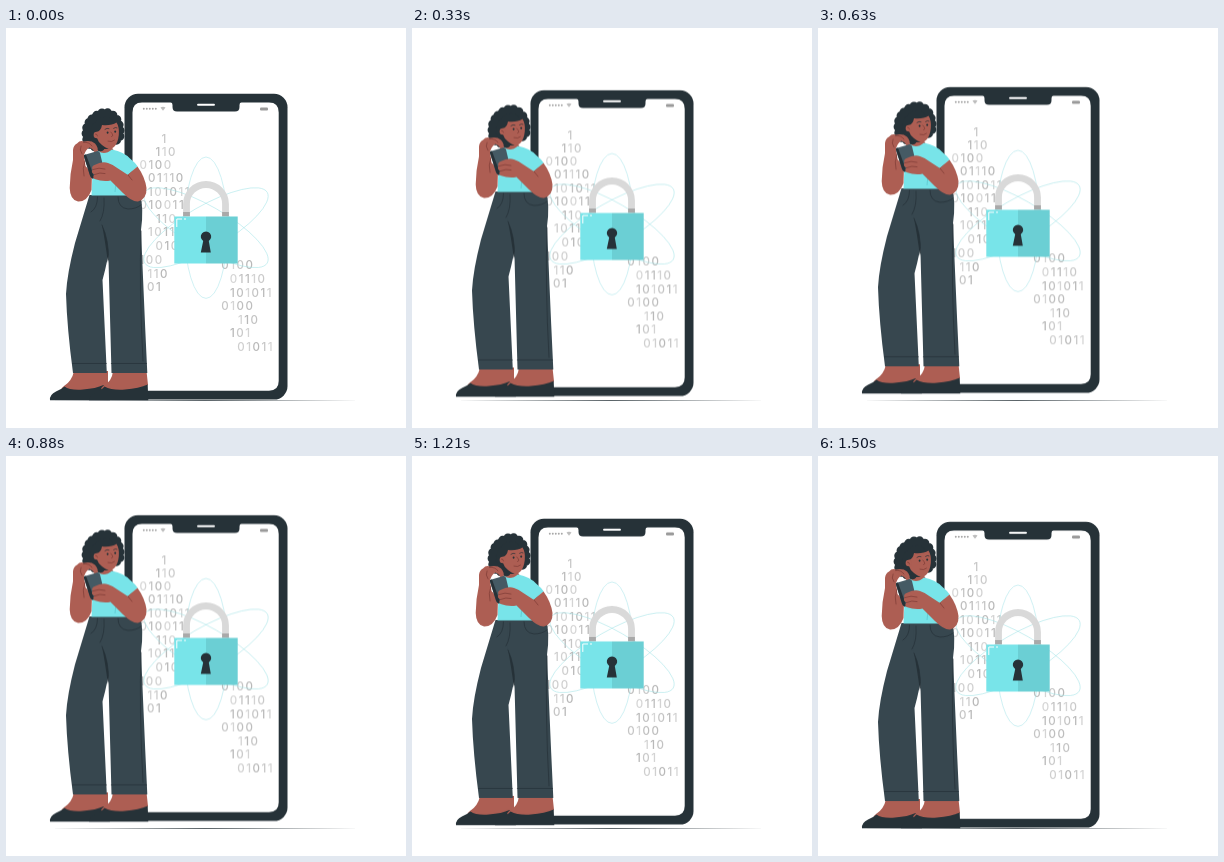
An HTML page that plays this animation: 400 by 400 pixels, repeating every 1.54 s.

```html
<!DOCTYPE html>
<html lang="en">
<head>
<meta charset="utf-8">
<title>Phone security</title>
<style>
  html, body { margin: 0; width: 100%; height: 100%; overflow: hidden; background: #fff; }
  svg { display: block; width: 100vw; height: 100vh; }
  .float { animation: float 1540ms linear infinite; }
  /* up for 750 ms, down for 750 ms, then a short rest */
  @keyframes float {
    0%, 97.403%, 100% { transform: translateY(0); }
    48.701% { transform: translateY(-8px); }
  }
  .dark { fill: #263238; }
  .skin { fill: #ad5e53; }
  .cyan { fill: #78e4e9; }
  .pants { fill: #37474f; }
  .line { fill: none; stroke: #263238; stroke-width: .7; stroke-linecap: round; stroke-linejoin: round; }
  .fold { fill: none; stroke: #7d3b36; stroke-width: .7; stroke-linecap: round; }
  .digits { font: 500 11.5px Inter, sans-serif; letter-spacing: 1.5px; fill: #b4b4b4; }
  .atom { fill: none; stroke: #a3e4e9; stroke-width: .6; stroke-opacity: .85; }
</style>
</head>
<body>
<svg viewBox="0 0 400 400">
  <path class="dark" d="M44 372.5Q199 371.9 354 372.5Q199 373.4 44 372.5Z"/>

  <g class="float">
    <g id="phone">
      <rect class="dark" x="118.5" y="65.8" width="163" height="305.8" rx="13.5"/>
      <path fill="#fff" d="M136 74.6H164.5Q166.500 74.6 166.500 77V79Q166.500 83.5 171 83.5H229Q233.500 83.5 233.500 79V77Q233.500 74.6 235.500 74.6H263Q272.700 74.6 272.700 84.5V353Q272.700 362.700 263 362.700H136Q126.500 362.700 126.500 353V84.500Q126.500 74.600 136 74.600Z"/>
      <path d="M192 76.700H208" stroke="#fff" stroke-width="1.900" stroke-linecap="round"/>
      <path d="M137.800 80.800H151" stroke="#a6a6a6" stroke-width="1.900" stroke-linecap="round" stroke-dasharray="0 3"/>
      <path d="M154.500 79.600Q157 77.800 159.500 79.600L157 82.800Z" fill="#bdbdbd"/>
      <rect x="254" y="79.400" width="8" height="3.200" rx="1" fill="#9a9a9a"/>
    </g>

    <g id="digits" class="digits"></g>

    <g class="atom">
      <ellipse cx="200" cy="199.700" rx="21.500" ry="70.700"/>
      <ellipse cx="200" cy="199.700" rx="21.500" ry="70.700" transform="rotate(60 200 199.700)"/>
      <ellipse cx="200" cy="199.700" rx="21.500" ry="70.700" transform="rotate(-60 200 199.700)"/>
    </g>

    <g id="lock">
      <path d="M180.500 188V176A19.500 19.500 0 0 1 219.500 176V188" fill="none" stroke="#d9d9d9" stroke-width="6.800"/>
      <path d="M177.100 184H183.900V188.500H177.100ZM216.100 184H222.900V188.500H216.100Z" fill="#a9a9a9"/>
      <path class="cyan" d="M168.300 188.400H200V235.400H168.300Z"/>
      <path fill="#6bcfd4" d="M200 188.400H231.700V235.400H200Z"/>
      <path d="M170.800 199V191H176M178 191H180" fill="none" stroke="#fff" stroke-width="1"/>
      <path class="dark" d="M197.200 213A5.200 5.200 0 1 1 202.800 213L204.800 224.500H194.800Z"/>
    </g>

    <g id="woman">
      <!-- feet -->
      <path class="skin" d="M68 343H102V357Q88 364 58 363.500Q53 361.500 58 358Q66 353 68 343Z"/>
      <path class="dark" d="M44 372.200Q43.500 366.500 50 363.500Q55 361.500 58.500 358.500Q64 362.500 77 361.500Q90 360.500 97.500 357L104 372.200Z"/>
      <path class="skin" d="M107 343H140.500L142 357Q128 364 97 362.500Q93 360.500 98 357.500Q106 353 107 343Z"/>
      <path class="dark" d="M83 372.200Q83 367.500 88 365.500Q95 362.500 98.500 358.500Q106 362.500 119 361.500Q133 360.500 141.700 356.500L142.300 372.200Z"/>

      <!-- trousers -->
      <path class="pants" d="M83.500 167H118L106 206Q102 232 96.500 252L100.800 345H67Q61 300 60 266Q61 246 69 215Z"/>
      <path class="dark" d="M96 197L106 200L102 235Q99 212 96 197Z"/>
      <path class="pants" d="M95 167H134Q138 180 135 202Q137 250 139.200 300L141.300 345H105.500L102.500 232Q103 212 96 197Z"/>
      <path class="line" d="M66.500 335.500H100.300M105.300 335.500H140.500M98 170Q99 185 94 193M91.500 169Q91.500 180 85 184M112 169Q112 180 122 181Q130 181 135 177M96 197Q103 212 102.500 232M135 203Q133 260 137 333"/>

      <!-- torso -->
      <path class="skin" d="M93 112L91 126L101 133L108 123L104 116Z"/>
      <path class="cyan" d="M92 122.500Q98 128 106 121.500Q118 124 124 130.500Q129 134.500 131.700 138.500L122 147V167.500H85.500L86.500 146Z"/>
      <path d="M108 150Q111 156 109 164" fill="none" stroke="#58c4cc" stroke-width=".7"/>

      <!-- hair and face -->
      <path class="dark" stroke="#263238" stroke-width="9" stroke-linecap="round" stroke-dasharray="0 5.800" d="M86 91Q98 80 108 88Q116 96 113.500 111L94 119Q82 120 80.500 110Q78.500 98 86 91Z"/>
      <path class="skin" d="M90.500 104Q95 103 96 97Q105 98 110.500 94.500Q113.500 99 112.800 107Q112 115 108 119Q103 123 96 117Q92 114 91 110Z"/>
      <circle class="skin" cx="90.800" cy="107" r="3.200"/>
      <path class="fold" d="M104.800 104Q108.500 108 105.600 108.600M102 113.200Q106 114.500 108.500 112.200M89.500 106Q91 105.500 91.500 108"/>
      <path class="line" d="M99 101.300Q101 99.600 103 100.600M107.600 100.300Q109.500 98.900 111 99.800"/>
      <ellipse class="dark" cx="101.600" cy="104.600" rx=".9" ry="1.200"/>
      <ellipse class="dark" cx="109.200" cy="103.600" rx=".9" ry="1.200"/>

      <!-- far arm and handset -->
      <path class="skin" d="M67 122Q67.500 117 71 115.500Q74 112 78 113.500Q85 112 89 115.500Q92.500 119 91.500 124.500L88.500 124Q87 120.500 83.500 119.500Q80 121 78 127L79.500 138L86 145L85.500 162Q81 174 72 173.500Q64 172 63.700 160Q64 145 67 132Z"/>
      <path class="fold" d="M75 118Q73 122 76 126M77.500 114.500Q83 113.500 86 118M79 133Q76 141 78 148"/>
      <path fill="#455a64" d="M78 127L91.500 123Q93.500 123 94 125L99 146L86.500 150.500Q84.500 149.500 84 147.500L78 128.500Z"/>
      <path class="dark" d="M78 127L80 126.500L88.500 150L86.500 150.500Q84.500 149.500 84 147.500L78 128.500Z"/>

      <!-- near arm -->
      <path class="skin" d="M122 146.500L131.500 138.500Q139 149 140.500 160Q141 171 132 173.500Q126 174 117 165L104.500 152.500Q97 154 88.500 151Q86 149 88.500 146.500Q84.500 144.500 86.500 141.500Q85 138.500 88.500 137Q96 133 102 135Q107 136.500 112 140.500L122 147Z"/>
      <path class="fold" d="M87 141.500Q93 139 99 141M88.500 146.500Q94 144 99 145.500M122 147L126 152"/>
    </g>
  </g>
</svg>
<script>
  // each row: digits, left edge, vertical middle
  const rows = [
    ['1', 155.500, 111], ['110', 149.500, 123.500], ['0100', 133.500, 136.500],
    ['01110', 142, 150], ['101011', 142, 163.500], ['010011', 133.500, 177],
    ['110', 150, 190.500], ['1011', 142, 204], ['010', 149.500, 217.500],
    ['100', 133.500, 232], ['110', 141.500, 245.500], ['01', 141, 259],
    ['0100', 215.300, 237], ['01110', 223.700, 250.500], ['101011', 224, 264.500],
    ['0100', 215.300, 278], ['110', 232, 291.500], ['101', 224, 305],
    ['01011', 231.300, 318.500]
  ];
  const shade = (r, c) => (0.76 + 0.2 * Math.sin(r * 2.3 + c * 1.9)).toFixed(2);
  document.getElementById('digits').innerHTML = rows.map(([text, x, y], r) =>
    `<text x="${x}" y="${y + 4.2}">` +
    [...text].map((d, c) => `<tspan fill-opacity="${shade(r, c)}">${d}</tspan>`).join('') +
    '</text>').join('');
</script>
</body>
</html>
```
